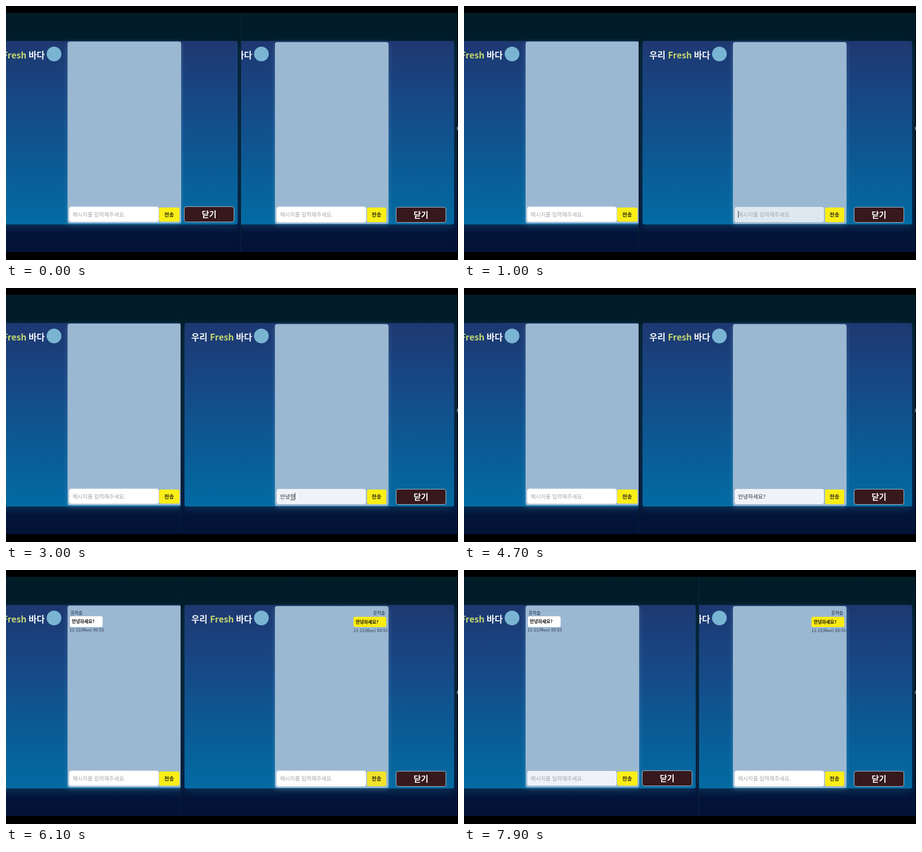
Animation of 800 by 450 pixels, one loop 8000 ms. Source, as an HTML page:

```html
<!DOCTYPE html>
<html lang="ko">
<head>
<meta charset="utf-8">
<title>Chat</title>
<style>
  html, body { margin: 0; width: 100%; height: 100%; overflow: hidden; background: #000; }
  #stage {
    position: relative; width: 800px; height: 450px; overflow: hidden; background: #000;
    font-family: "Noto Sans CJK KR", "Noto Sans CJK JP", "Noto Sans", sans-serif;
  }
  #stage div { position: absolute; box-sizing: border-box; white-space: pre; }

  .window {
    top: 12px; height: 424px; overflow: hidden;
    background: linear-gradient(#001c27, #021c2a 12%, #061c33 60%, #04153a 90%, #031237);
  }
  .window.left { left: 0; width: 416px; border-right: 1px solid #0a2635; z-index: 2; animation: raise 8s infinite; }
  .window.right { left: 309px; width: 490px; border-left: 1px solid #06202d; z-index: 1; }

  /* Both windows share one layout, shifted sideways. */
  .scene { top: -12px; width: 800px; height: 450px; }
  .left .scene { left: -367px; top: -12.5px; }
  .right .scene { left: -310px; }

  .panel {
    left: 316px; top: 62px; width: 477px; height: 325px; border-radius: 3px;
    background: linear-gradient(#1e3871, #164986 35%, #0a5c96 70%, #036ba2);
    box-shadow: 0 5px 14px rgba(24, 92, 128, .42);
  }
  .left .panel { width: 461px; }

  .title { top: 74px; line-height: 24px; font-size: 15.6px; font-weight: 700; color: #f5f8fa; }
  .title.accent { color: #c4d86f; }
  .badge { left: 439px; top: 72px; width: 26px; height: 26px; border-radius: 50%; background: #79b5d3; }

  .chat {
    left: 476px; top: 63.5px; width: 200.5px; height: 322px; border-radius: 4px;
    background: #9bb8d2; box-shadow: 0 2px 8px rgba(150, 195, 230, .3);
  }
  .input {
    left: 479px; top: 356px; width: 157.5px; height: 26.5px; padding-left: 6px; border-radius: 4px;
    line-height: 26px; font-size: 9.6px; color: #333;
    background: #fff; box-shadow: 0 0 3px #fff;
  }
  .left .input { animation: focus-left 8s infinite; }
  .right .input { animation: focus-right 8s infinite; }
  .input.empty { color: #a3a5a9; }
  .input u { text-decoration: none; box-shadow: 0 1px #555; display: inline-block; line-height: 12px; }
  .input i { display: inline-block; width: 1px; height: 12px; margin-right: -1px; vertical-align: -2px; background: #333; }

  .send {
    left: 638.5px; top: 357px; width: 34.5px; height: 25.5px; border-radius: 3px;
    line-height: 25px; text-align: center; font-size: 9.4px; font-weight: 700; color: #2a2510;
    background: #fbee18;
  }
  .left .send { left: 638px; width: 35.5px; }
  .right .send { animation: hover 8s infinite; }
  .close {
    left: 690px; top: 355.5px; width: 89px; height: 28px; border-radius: 4px;
    border: 1px solid #a9b6c2; background: #37191d;
    line-height: 25px; text-align: center; font-size: 14.2px; font-weight: 900; color: #fff;
  }
  .left .close { left: 682px; }

  .message { left: 479.5px; top: 70px; width: 58px; height: 44px; visibility: hidden; animation: arrive 8s infinite; }
  .right .message { left: 615px; }
  .sender { left: 2px; top: 0; line-height: 11px; font-size: 7.6px; font-weight: 500; color: #1c2733; }
  .right .sender { left: auto; right: 2px; }
  .bubble {
    left: 0; top: 12.5px; width: 58px; height: 18.5px; padding-left: 4px; border-radius: 3px;
    line-height: 18.5px; font-size: 7.9px; font-weight: 700; color: #151515; background: #fff;
  }
  .right .bubble { background: #ffec12; }
  .date { left: 0; top: 31.5px; line-height: 11px; font-size: 7.1px; font-weight: 700; color: #4c5f74; }

  .mark { left: 798px; top: 214px; width: 2px; height: 6px; background: #59717f; z-index: 3; }

  @keyframes raise {
    0%, 11.24% { z-index: 2; }
    11.25%, 84.99% { z-index: 0; }
    85%, 100% { z-index: 2; }
  }
  @keyframes focus-right {
    0%, 11.24% { background: #fff; box-shadow: 0 0 3px #fff; }
    11.25%, 12.5% { background: #dfe8f0; box-shadow: 0 0 0 #fff; }
    15%, 65% { background: #eff3f8; box-shadow: 0 0 0 #fff; }
    67.5%, 100% { background: #fff; box-shadow: 0 0 3px #fff; }
  }
  @keyframes focus-left {
    0%, 85% { background: #fff; box-shadow: 0 0 3px #fff; }
    88%, 100% { background: #eff3f8; box-shadow: 0 0 0 #fff; }
  }
  @keyframes hover {
    0%, 62% { background: #fbee18; }
    63.5%, 80% { background: #f0e22b; }
    82%, 100% { background: #fbee18; }
  }
  @keyframes arrive {
    0%, 66.24% { visibility: hidden; }
    66.25%, 100% { visibility: visible; }
  }
</style>
</head>
<body>
<div id="stage"></div>
<script>
  const LOOP = 8000, FOCUS = 900, SENT = 5300, BLINK = 500;
  const PLACEHOLDER = '메시지를 입력해주세요.';

  const windowMarkup = side => `
    <div class="window ${side}"><div class="scene">
      <div class="panel"></div>
      <div class="title" style="left:328px">우리</div>
      <div class="title accent" style="left:361px">Fresh</div>
      <div class="title" style="left:407px">바다</div>
      <div class="badge"></div>
      <div class="chat"></div>
      <div class="message">
        <div class="sender">윤하솔</div>
        <div class="bubble">안녕하세요?</div>
        <div class="date">11-21(Mon) 00:55</div>
      </div>
      <div class="input empty">${PLACEHOLDER}</div>
      <div class="send">전송</div>
      <div class="close">닫기</div>
    </div></div>`;

  document.getElementById('stage').innerHTML =
    windowMarkup('left') + windowMarkup('right') + '<div class="mark"></div>';

  // Each keystroke: time, committed text, syllable being composed.
  const strokes = [
    [FOCUS, '', ''],
    [1900, '', 'ㅇ'], [2000, '', '아'], [2100, '', '안'],
    [2300, '안', 'ㄴ'], [2450, '안', '녀'], [2600, '안', '녕'],
    [2750, '안녕', 'ㅎ'], [2850, '안녕', '하'], [3000, '안녕', '핫'],
    [3200, '안녕하', '세'], [3400, '안녕하', '셍'], [3550, '안녕하세', '요'],
    [3900, '안녕하세요?', '']
  ];

  const field = document.querySelector('.right .input');
  let shown = '';

  function fieldMarkup(t) {
    const stroke = t < SENT && strokes.filter(s => s[0] <= t).pop();
    if (!stroke) return PLACEHOLDER;
    const [time, text, composing] = stroke;
    const caret = Math.floor((t - time) / BLINK) % 2 ? '' : '<i></i>';
    if (!text && !composing) return caret + PLACEHOLDER;
    return text + (composing && `<u>${composing}</u>`) + caret;
  }

  const start = performance.now();
  function draw() {
    const markup = fieldMarkup((performance.now() - start) % LOOP);
    if (markup !== shown) {
      field.innerHTML = shown = markup;
      field.classList.toggle('empty', markup.endsWith(PLACEHOLDER));
    }
    requestAnimationFrame(draw);
  }
  draw();
</script>
</body>
</html>
```
